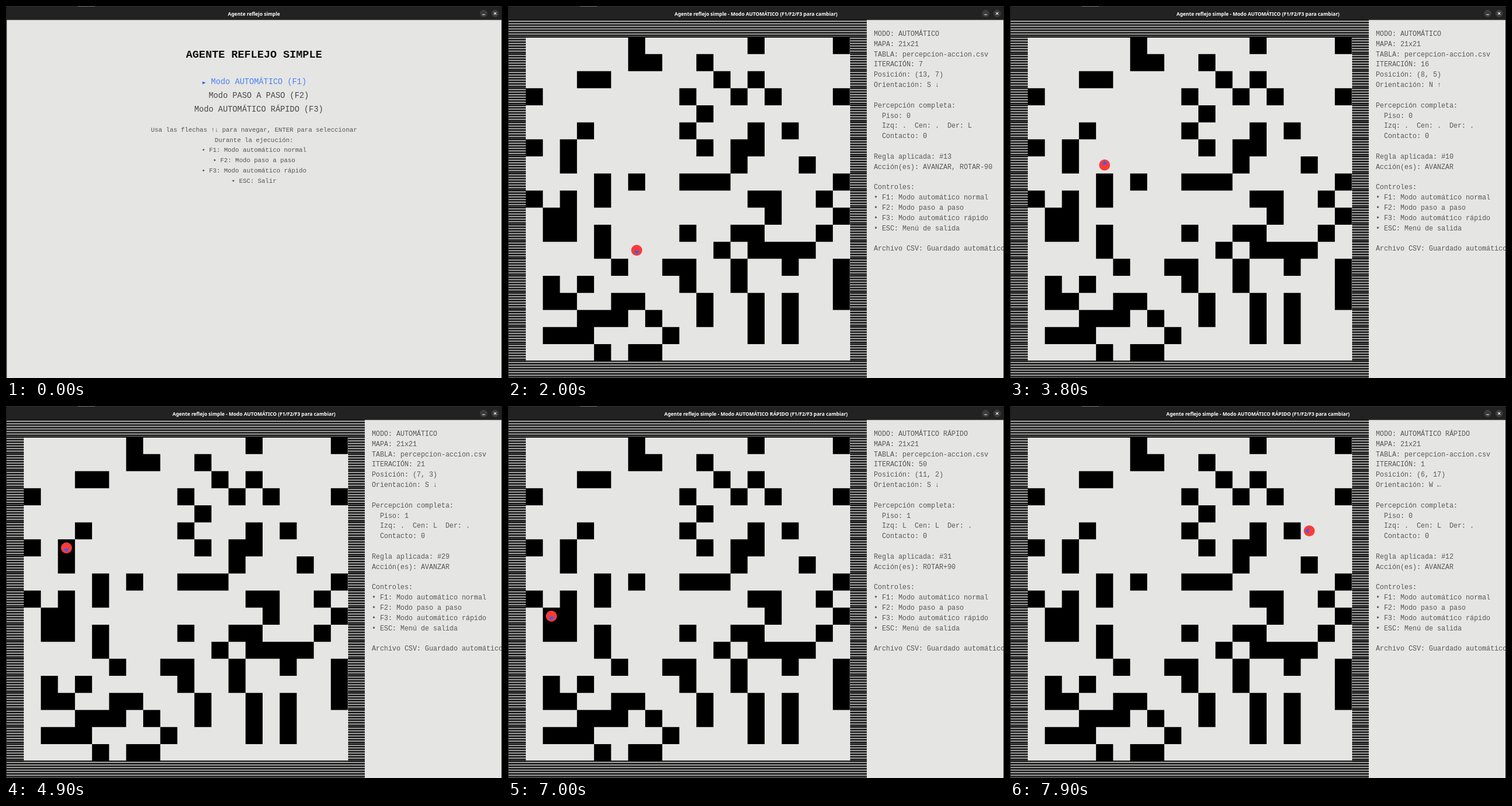
Write an HTML page with a canvas that moves like this. It is 864 px wide and 648 px high and loops after 8 s.

```html
<!DOCTYPE html>
<html lang="es">
<head>
<meta charset="utf-8">
<title>Agente reflejo simple</title>
<style>
  html, body { margin: 0; width: 100%; height: 100%; overflow: hidden; background: #222; }
  canvas { display: block; }
</style>
</head>
<body>
<canvas id="stage" width="864" height="648"></canvas>
<script>
const ctx = document.getElementById('stage').getContext('2d');
const LOOP = 8000, LEFT = 1.3, TOP = 24.35, CELL = 29.714, N = 21;
const UNIT = CELL / 40, PT = 4 / 3 * UNIT;
const BG = '#e5e5e3', BLUE = '#4a82f5';
const MONO = '"Liberation Mono", monospace';

const MAP = [
  '......#......#....#',
  '......##..#........',
  '...##......#.#.....',
  '#........#..#.#...#',
  '..........#........',
  '...#.....#...#.#...',
  '#.#.......#.##.....',
  '..#.........#...#..',
  '....#.#..###......#',
  '#.#.#........##..#.',
  '.##...........#...#',
  '.##.#....#..##...#.',
  '....#......#.####..',
  '.....#..##..#..#..#',
  '.#.#.....#..#.....#',
  '.##..##...#..#.#..#',
  '...###.#..#..#.#...',
  '.###....#....#.#...',
  '....#.##...........'
];

// The agent looks at the three cells ahead and picks a rule from the table.
const DIRS = [['N', '↑', -1, 0], ['E', '→', 0, 1], ['S', '↓', 1, 0], ['W', '←', 0, -1]];
const VIEWS = ['...', 'L..', '.L.', '..L', 'LL.', 'L.L', '.LL', 'LLL'];
const GO = 'AVANZAR', LEFT90 = 'ROTAR+90', RIGHT90 = 'ROTAR-90';
const ACTIONS = [[GO], [GO, LEFT90], [GO], [GO, RIGHT90], [LEFT90], [GO], [GO, RIGHT90], [RIGHT90]];

const isBlack = (r, c) => (MAP[r - 1] || '')[c - 1] === '#';

function sense(a) {
  const [, , dr, dc] = DIRS[a.d];
  const view = [-1, 0, 1].map(s => isBlack(a.r + dr + s * dc, a.c + dc - s * dr) ? 'L' : '.');
  const floor = isBlack(a.r, a.c) ? 1 : 0;
  const k = VIEWS.indexOf(view.join(''));
  return { ...a, view, floor, rule: 10 + 17 * floor + k, acts: ACTIONS[k] };
}

function act(s) {
  let { r, c, d } = s;
  for (const a of s.acts) {
    if (a === GO) { r += DIRS[d][2]; c += DIRS[d][3]; }
    else d = (d + (a === RIGHT90 ? 1 : 3)) % 4;
  }
  return sense({ r, c, d });
}

function simulate(start, count) {
  const first = sense(start), list = [first, first];
  while (list.length <= count) list.push(act(list[list.length - 1]));
  return list;
}

const runA = simulate({ r: 7, c: 7, d: 2 }, 60);
const runB = simulate({ r: 6, c: 17, d: 3 }, 4);

function rect(x, y, w, h, color) {
  ctx.fillStyle = color;
  ctx.fillRect(x, y, w, h);
}

function disc(x, y, r, color) {
  ctx.fillStyle = color;
  ctx.beginPath();
  ctx.arc(x, y, r, 0, Math.PI * 2);
  ctx.fill();
}

function tri(points, color) {
  ctx.fillStyle = color;
  ctx.beginPath();
  points.forEach(p => ctx.lineTo(...p));
  ctx.fill();
}

function text(str, x, y, font, color, align = 'left') {
  ctx.font = font;
  ctx.fillStyle = color;
  ctx.textAlign = align;
  ctx.fillText(str, x, y);
}

function stroke(x1, y1, x2, y2) {
  ctx.beginPath();
  ctx.moveTo(x1, y1);
  ctx.lineTo(x2, y2);
  ctx.stroke();
}

function drawWindow(title) {
  rect(0, 0, 864, 648, '#1d1d1d');
  rect(0, 0, 864, 1, '#333');
  rect(125, 0, 30, 1, '#777');
  ctx.fillStyle = '#222';
  ctx.beginPath();
  ctx.roundRect(1, 1, 862, 30, [8, 8, 0, 0]);
  ctx.fill();
  rect(1.3, TOP, 861.7, 624, BG);
  text(title, 432, 16.7, '700 8.52px "Noto Sans", sans-serif', '#fff', 'center');
  disc(832, 13, 6.5, '#3b3b3b');
  disc(852, 13, 6.5, '#3b3b3b');
  ctx.strokeStyle = '#f2f2f2';
  ctx.lineWidth = 1.1;
  stroke(829.6, 15, 834.4, 15);
  stroke(849.8, 10.8, 854.2, 15.2);
  stroke(854.2, 10.8, 849.8, 15.2);
}

function drawMenu(m) {
  text(m.title, 432, 90, `700 ${m.sizes[0] * PT}px ${MONO}`, '#111', 'center');
  const size = m.sizes[1] * PT, adv = size * 0.6;
  m.items.forEach((s, i) => {
    const x = 432 - (s.length + 2) * adv / 2, y = 132.2 + 23.77 * i;
    text(s, x + 2 * adv, y + size * 0.3, `${size}px ${MONO}`, i ? '#474747' : BLUE);
    if (!i) tri([[x + 1.7, y - 0.8], [x + 7.6, y + 1.6], [x + 1.7, y + 4]], '#2463f0');
  });
  const small = m.sizes[2] * PT;
  const y0 = 215.3 + 23.77 * (m.items.length - 3);
  m.hints.forEach((s, i) =>
    text(s, 432, y0 + 17.83 * i + small * 0.31, `${small}px ${MONO}`, '#545454', 'center'));
}

// Striped wall cell: centred lines every 6 units and one on its lower edge.
function drawWall(r, c) {
  const x = Math.round(LEFT + c * CELL), w = Math.round(LEFT + (c + 1) * CELL) - x;
  const y = TOP + r * CELL, thick = 2.6 * UNIT;
  rect(x, y + thick / 2, w, CELL - thick / 2, '#999');
  for (let k = 0; k < 46; k += 6) {
    const mid = y + Math.min(k, 40) * UNIT;
    rect(x, mid - thick / 2, w, thick, '#000');
  }
}

function drawGrid() {
  const blocks = new Path2D();
  ctx.save();
  ctx.beginPath();
  ctx.rect(1, 24, 624.3, 624);
  ctx.clip();
  for (let r = 0; r < N; r++) {
    for (let c = 0; c < N; c++) {
      if (r % 20 === 0 || c % 20 === 0) drawWall(r, c);
      else if (isBlack(r, c)) blocks.rect(LEFT + c * CELL, TOP + r * CELL, CELL, CELL);
    }
  }
  ctx.fillStyle = '#000';
  ctx.fill(blocks);
  ctx.restore();
}

function drawAgent(s) {
  const x = LEFT + (s.c + 0.5) * CELL, y = TOP + (s.r + 0.5) * CELL;
  const [, , dr, dc] = DIRS[s.d];
  const at = (f, side) => [x + dc * f - dr * side, y + dr * f + dc * side];
  disc(x, y, 9.6, '#fb3b38');
  tri([at(7.6, 0), at(1, 5), at(1, -5)], '#3a5ff0');
}

function drawPanel(s, iter, mode) {
  const [name, arrow] = DIRS[s.d], [l, m, r] = s.view;
  const lines = [
    `MODO: ${mode}`,
    'MAPA: 21x21',
    'TABLA: percepcion-accion.csv',
    `ITERACIÓN: ${iter}`,
    `Posición: (${s.r}, ${s.c})`,
    `Orientación: ${name} ${arrow}`,
    '',
    'Percepción completa:',
    `  Piso: ${s.floor}`,
    `  Izq: ${l}  Cen: ${m}  Der: ${r}`,
    '  Contacto: 0',
    '',
    `Regla aplicada: #${s.rule}`,
    `Acción(es): ${s.acts.join(', ')}`,
    '',
    'Controles:',
    '• F1: Modo automático normal',
    '• F2: Modo paso a paso',
    '• F3: Modo automático rápido',
    '• ESC: Menú de salida',
    '',
    'Archivo CSV: Guardado automático'
  ];
  ctx.save();
  ctx.beginPath();
  ctx.rect(625, 24, 238, 624);
  ctx.clip();
  lines.forEach((str, i) => text(str, 637.2, 52 + 17.83 * i, `${12 * PT}px ${MONO}`, '#585858'));
  ctx.restore();
}

const startMenu = {
  title: 'AGENTE REFLEJO SIMPLE',
  sizes: [19, 14, 11],
  items: ['Modo AUTOMÁTICO (F1)', 'Modo PASO A PASO (F2)', 'Modo AUTOMÁTICO RÁPIDO (F3)'],
  hints: [
    'Usa las flechas ↑↓ para navegar, ENTER para seleccionar',
    'Durante la ejecución:',
    '• F1: Modo automático normal',
    '• F2: Modo paso a paso',
    '• F3: Modo automático rápido',
    '• ESC: Salir'
  ]
};

const exitMenu = {
  title: '¿QUÉ DESEAS HACER?',
  sizes: [17, 13, 10],
  items: ['Reiniciar recorrido del agente', 'Volver al menú inicial', 'Volver al menú de modo', 'Salir completamente'],
  hints: ['Usa las flechas ↑↓ para navegar, ENTER para seleccionar', '• ESC: Cancelar']
};

// Steady ticks with a slightly longer pause at two points, then the fast mode.
function iteration(t) {
  const tick = (from, base, last) => Math.min(last, base + Math.floor((t - from) / 200));
  if (t < 2000) return tick(500, 0, 6);
  if (t < 4500) return tick(2000, 7, 18);
  if (t < 5500) return tick(4500, 19, 23);
  if (t < 7100) return 24 + Math.floor((t - 5500) / 57);
  return t < 7900 ? 0 : 1;
}

function draw(time) {
  const t = Math.floor(time / 100) * 100;
  const mode = t < 5500 ? 'AUTOMÁTICO' : 'AUTOMÁTICO RÁPIDO';
  const base = 'Agente reflejo simple';
  drawWindow(t < 500 ? base : `${base} - Modo ${mode} (F1/F2/F3 para cambiar)`);
  if (t < 500) return drawMenu(startMenu);
  if (t >= 7100 && t < 7700) return drawMenu(exitMenu);
  const iter = iteration(t);
  const state = (t < 7100 ? runA : runB)[iter];
  drawGrid();
  drawAgent(state);
  drawPanel(state, iter, mode);
}

const start = performance.now();
function frame() {
  draw((performance.now() - start) % LOOP);
  requestAnimationFrame(frame);
}
frame();
</script>
</body>
</html>
```
